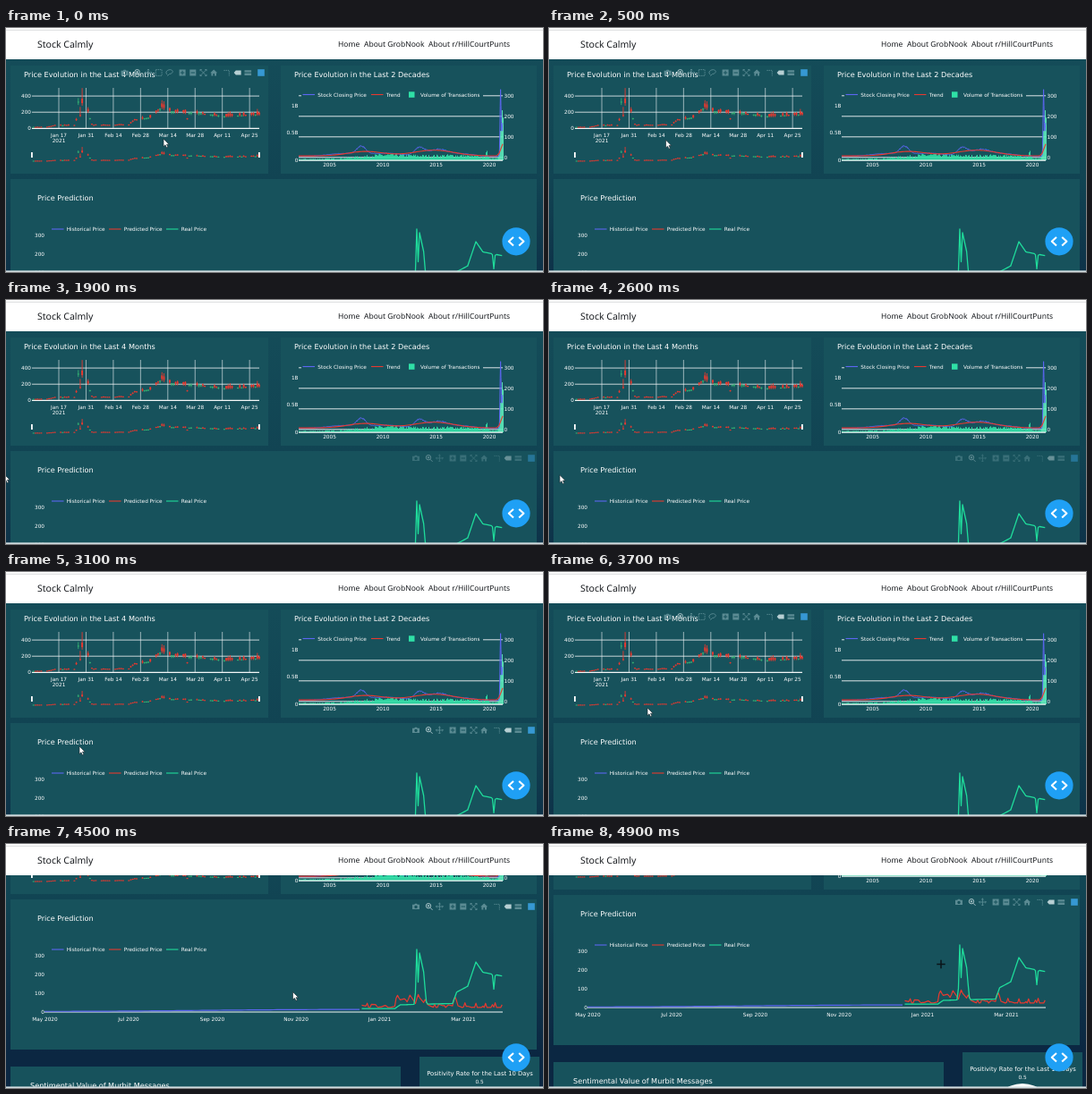
An HTML page that plays this animation: 600x273 px, repeating every 5000 ms.

```html
<!DOCTYPE html>
<html lang="en">
<head>
<meta charset="utf-8">
<title>Stock dashboard</title>
<style>
html, body { margin: 0; width: 100%; height: 100%; overflow: hidden; background: #124553; }
svg { display: block; width: 100vw; height: 100vh; }
text { font-family: "DejaVu Sans", Verdana, sans-serif; fill: #fff; text-rendering: geometricPrecision; }
.nav { font-family: "Noto Sans", "Open Sans", sans-serif; fill: #1a1d21; }
</style>
</head>
<body>
<svg id="stage" viewBox="0 0 600 273" preserveAspectRatio="none">
  <defs>
    <linearGradient id="sky" x1="0" y1="0" x2="0" y2="1">
      <stop offset="0" stop-color="#154e5a"/>
      <stop offset=".42" stop-color="#114453"/>
      <stop offset=".85" stop-color="#0b2742"/>
    </linearGradient>
  </defs>
  <g id="page"></g>
  <g id="chrome"></g>
  <path id="arrow" d="M0 0V8.6L2 6.8L3.4 9.8L4.9 9.1L3.5 6.2H6.2Z" fill="#fff" stroke="#15242b" stroke-width=".6"/>
  <path id="cross" d="M-4.7 0H4.7M0 -4.7V4.7" stroke="#0a1418" stroke-width="1.5"/>
</svg>
<script>
const LOOP = 5000, STEP = 100;
const PURPLE = "#5c66f2", RED = "#e8392f", GREEN = "#1fdc9b", MINT = "#2fe0a6";
const PANEL = "#17525c", WHITE = "#f4f7f8";
const $ = id => document.getElementById(id);
const page = $("page"), chrome = $("chrome");

function el(parent, tag, attrs, content) {
  const node = document.createElementNS("http://www.w3.org/2000/svg", tag);
  for (const k in attrs) node.setAttribute(k, attrs[k]);
  if (content) node.textContent = content;
  parent.appendChild(node);
  return node;
}
const box = (p, x, y, width, height, fill) => el(p, "rect", { x, y, width, height, fill });
const path = (p, d, stroke, width) =>
  el(p, "path", { d, stroke, "stroke-width": width, fill: "none", "stroke-linejoin": "round" });
const label = (p, x, y, str, size = 5.75, anchor = "start", more) =>
  el(p, "text", { x, y, "font-size": size, "text-anchor": anchor, ...more }, str);

// Draws y = f(x) through the given x values
const plot = (xs, f, color, width) =>
  path(page, "M" + xs.map(x => x.toFixed(2) + " " + f(x).toFixed(2)).join("L"), color, width);

function range(from, to, step = 1) {
  const out = [];
  for (let v = from; v <= to; v += step) out.push(v);
  return out;
}

// Linear interpolation in rows of [key, value, ...]
function at(rows, t, col = 1) {
  const i = rows.findIndex(r => t <= r[0]);
  if (i < 0) return rows[rows.length - 1][col];
  if (i == 0) return rows[0][col];
  const a = rows[i - 1], b = rows[i];
  return a[col] + (b[col] - a[col]) * (t - a[0]) / (b[0] - a[0]);
}

const bump = (x, center, width, height) => height * Math.exp(-(((x - center) / width) ** 2));

let seed = 7;
const rand = () => (seed = (seed * 16807) % 2147483647) / 2147483647;

// Closing price by day, 0 = January 1: a slow drift plus the January squeeze
const drift = [[10, 18], [14, 38], [52, 45], [55, 105], [63, 136], [69, 264], [74, 210], [88, 190], [101, 150], [119, 174]];
const close = d => at(drift, d) + bump(d, 26, .8, 290) + bump(d, 28, .8, 270) +
  bump(d, 31, 1.2, 170) - bump(d, 82, .6, 78);
const tradingDays = (from, to) => range(from, to).filter(d => ![1, 2].includes((d + 70) % 7));

function legendLine(x, y, color, str) {
  path(page, `M${x} ${y}h13.5`, color, 1.1);
  label(page, x + 16.8, y + 2.1, str);
}

function buildCandles() {
  const y0 = 112.3, k = .0905;
  label(page, 20, 55, "Price Evolution in the Last 4 Months", 8.2);
  for (const v of [400, 200, 0]) {
    path(page, `M29 ${y0 - v * k}H283`, WHITE, v ? .8 : 1.2);
    label(page, 28, y0 - v * k + 2.1, String(v), 5.75, "end");
  }
  ["Jan 17", "Jan 31", "Feb 14", "Feb 28", "Mar 14", "Mar 28", "Apr 11", "Apr 25"].forEach((s, i) => {
    const x = 59 + i * 30.45;
    path(page, `M${x} 67V113`, WHITE, .6);
    label(page, x, 121.7, s, 5.75, "middle");
  });
  label(page, 59, 128.2, "2021", 5.75, "middle");

  for (const d of tradingDays(3, 119)) {
    const end = close(d), open = end * (.93 + rand() * .27);
    const x = 59 + (d - 16) * 2.175;
    const top = Math.max(open, end), gap = Math.abs(end - open);
    const high = top + gap * rand() + bump(d, 27.5, 1.5, 110), low = Math.min(open, end) * .9;
    const color = end > open ? "#35b173" : RED;
    for (const [base, scale] of [[y0, k], [149, .032]]) {
      path(page, `M${x} ${base - high * scale}V${base - low * scale}`, color, .9);
      box(page, x - .95, base - top * scale, 1.9, Math.max(1.1, gap * scale), color);
    }
  }
  for (const x of [28, 282]) box(page, x, 139, 1.8, 6, "#fff");
}

function buildHistory() {
  const y = p => 145 - p * .23;
  label(page, 322, 55, "Price Evolution in the Last 2 Decades", 8.15);
  for (const v of [300, 200, 100, 0]) {
    path(page, `M327 ${y(v) - .2}H555`, WHITE, .9);
    label(page, 556.5, y(v) + 2, String(v));
  }
  box(page, 330, 68, 203, 12, PANEL);
  ["1B", "0.5B", "0"].forEach((s, i) => label(page, 326.5, 88.8 + i * 30.6, s, 5.75, "end"));
  for (let year = 2005; year <= 2020; year += 5)
    label(page, 361.5 + (year - 2005) * 11.9, 155.2, String(year), 5.75, "middle");

  for (const x of range(327, 555)) {
    const size = 1.5 + bump(x, 430, 45, 5) + bump(x, 505, 35, 4) + bump(x, 536, 1.5, 9) + bump(x, 554, 3, 50);
    const h = size * (.55 + rand() * .65);
    box(page, x, 148 - h, .9, h, x > 549 ? "#5debbb" : MINT);
  }
  path(page, "M327 148.2H555", WHITE, 1.2);

  const price = x => 6 + bump(x, 378, 25, 14) + bump(x, 397, 7, 38) + bump(x, 425, 25, 15) +
    bump(x, 462, 8, 38) + bump(x, 483, 15, 34) + bump(x, 510, 18, 12) + bump(x, 552.6, .8, 300) + bump(x, 555, 1.5, 165);
  const trend = x => 8 + bump(x, 402, 28, 22) + bump(x, 478, 32, 28) + bump(x, 556, 4, 62);
  plot(range(327, 555, .4), x => y(price(x) * (.94 + rand() * .12)), PURPLE, 1);
  plot(range(327, 555, 2), x => y(trend(x)), RED, 1.1);

  legendLine(331.5, 74.5, PURPLE, "Stock Closing Price");
  legendLine(408, 74.5, RED, "Trend");
  box(page, 450, 71.3, 6.5, 6.5, MINT);
  label(page, 463, 76.6, "Volume of Transactions");
}

function buildPrediction() {
  const y = p => 295 - p * .212, day = x => (x - 419) / 1.537;
  label(page, 35, 193, "Price Prediction", 8.1);
  legendLine(51, 225, PURPLE, "Historical Price");
  legendLine(115, 225, RED, "Predicted Price");
  legendLine(179, 225, GREEN, "Real Price");
  for (const v of [300, 200, 100, 0]) label(page, 43, y(v) + 2.1, String(v), 5.75, "end");
  ["May 2020", "Jul 2020", "Sep 2020", "Nov 2020", "Jan 2021", "Mar 2021"].forEach((s, i) =>
    label(page, 43.5 + i * 93.5, 304.7, s, 5.75, "middle"));
  path(page, "M43 295H555", WHITE, 1.2);

  const guess = d => 24 + 26 * rand() ** 3 + bump(d, 12, 1.2, 50) + bump(d, 17, 4, 30) +
    bump(d, 22, 2, 55) + bump(d, 27, 1.5, 50) + bump(d, 31, 4, 26) + bump(d, 54, 1.5, 52);
  const days = tradingDays(-14, 88).map(d => 419 + d * 1.537);
  plot(range(43, 395, 4), x => y(8.5 - 5 * Math.cos((x - 43) / 112)), PURPLE, 1.2);
  plot(days, x => y(guess(day(x))), RED, 1.2);
  plot(days, x => y(close(day(x))), GREEN, 1.3);
}

const panels = [[5, 42, 288, 121], [307, 42, 286, 121], [5, 169, 588, 168], [5, 356, 436, 60], [462, 345, 134, 60]];

function buildPage() {
  box(page, 0, 0, 600, 400, "url(#sky)");
  for (const p of panels) box(page, ...p, PANEL);
  buildCandles();
  buildHistory();
  buildPrediction();
  label(page, 27, 380, "Sentimental Value of Murbit Messages", 8.15);
  label(page, 529.5, 366, "Positivity Rate for the Last 10 Days", 6.75, "middle");
  label(page, 529, 375.2, "0.5", 5.75, "middle");
  el(page, "circle", { cx: 529, cy: 414, r: 34, fill: "#fff" });
}

// Toolbar glyphs, each centred on 0,0: [path, solid, dash]
const glyphs = {
  camera: ["M-4 -2.2H-1.8L-1 -3.2H1L1.8 -2.2H4V3H-4ZM0 -1.3A1.7 1.7 0 1 0 .01 -1.3Z", true],
  zoom: ["M1.3 1.3L3.8 3.8M2 -.8A2.7 2.7 0 1 1 -3.4 -.8A2.7 2.7 0 1 1 2 -.8M-2 -.8H.6M-.7 -2.1V.5"],
  pan: ["M-4 0H4M0 -4V4M-2.8 -1.2L-4 0L-2.8 1.2M2.8 -1.2L4 0L2.8 1.2M-1.2 -2.8L0 -4L1.2 -2.8M-1.2 2.8L0 4L1.2 2.8"],
  select: ["M-3.4 -3.4H3.4V3.4H-3.4Z", false, "1.5 .8"],
  lasso: ["M-2 2.4C-6 -1 -1 -4 2 -3.2S4.4 1 0 1.6L-2 3.6"],
  plus: ["M-3.5 -3.5H3.5V3.5H-3.5ZM-.5 -2.2V-.5H-2.2V.5H-.5V2.2H.5V.5H2.2V-.5H.5V-2.2Z", true],
  minus: ["M-3.5 -3.5H3.5V3.5H-3.5ZM-2.2 -.5V.5H2.2V-.5Z", true],
  fit: ["M-3.5 -3.5L3.5 3.5M3.5 -3.5L-3.5 3.5M-3.5 -1.8V-3.5H-1.8M1.8 -3.5H3.5V-1.8M3.5 1.8V3.5H1.8M-1.8 3.5H-3.5V1.8"],
  home: ["M-4 .2L0 -3.6L4 .2H2.8V3.4H.8V1H-.8V3.4H-2.8V.2Z", true],
  spike: ["M-3.5 -2.6H2.4V3.6", false, "1.4 .8"],
  tag: ["M-4 0L-1.8 -2.4H4V2.4H-1.8Z", true],
  pair: ["M-3.8 -2.8H3.8V-.5H-3.8ZM-3.8 .6H3.8V2.9H-3.8Z", true]
};

// Lays the groups out from the right edge to the left
function toolbar(right, y, dragTools) {
  const g = el(page, "g", {});
  const groups = ["camera", dragTools, "plus minus fit home", "spike tag pair"];
  box(g, right - 3.8, y - 3.8, 7.6, 7.6, "#3aa0e0");
  let x = right;
  for (const group of groups.reverse()) {
    x -= 3;
    for (const name of group.split(" ").reverse()) {
      x -= 11.7;
      const [d, solid, dash] = glyphs[name];
      const color = name == "zoom" || name == "tag" ? "#c9dde0" : "#63929a";
      el(g, "path", {
        d, transform: `translate(${x} ${y})`, fill: solid ? color : "none", "fill-rule": "evenodd",
        stroke: solid ? "none" : color, "stroke-width": .9, "stroke-dasharray": dash || "none"
      });
    }
  }
  return g;
}

function buildChrome() {
  box(chrome, 0, 0, 600, 35, "#fff");
  box(chrome, 0, 1.8, 600, .9, "#d4d6d8");
  const nav = (x, str, size) => label(chrome, x, 18 + size * .36, str, size, "start", { class: "nav" });
  nav(35, "Stock Calmly", 10.5);
  nav(371, "Home", 8.5);
  nav(400, "About GrobNook", 8.5);
  nav(472, "About r/HillCourtPunts", 8.5);
  box(chrome, 0, 271.4, 600, 1.6, "#d3dee1");
  el(chrome, "circle", { cx: 570, cy: 238.8, r: 15.6, fill: "#1fa0f5" });
  path(chrome, "M567 234L561.8 238.8L567 243.6M573.2 234L578.4 238.8L573.2 243.6", "#fff", 2.1);
}

buildPage();
const allDrag = "zoom pan select lasso";
const bars = [toolbar(285, 50, allDrag), toolbar(587, 50, allDrag), toolbar(587, 177, "zoom pan")];
buildChrome();

const pointer = [[0, 176, 124], [1100, 76, 127], [1900, -2, 195], [2500, -2, 196], [3100, 82, 195],
  [3700, 110, 152], [4000, 314, 150], [4300, 324.5, 166.5], [4500, 320.5, 165.5], [4900, 438, 134.5]];
const scroll = [[4300, 0], [4500, 107], [4600, 112]];

function hovers([x, y, w, h], t) {
  const px = at(pointer, t) - x, py = at(pointer, t, 2) + at(scroll, t) - y;
  return px > 0 && px < w && py > 0 && py < h;
}

function draw(ms) {
  const t = Math.floor(ms % LOOP / STEP) * STEP;
  page.setAttribute("transform", `translate(0 ${-at(scroll, t)})`);
  // A toolbar fades in and out over two steps as the pointer enters or leaves its panel
  bars.forEach((bar, i) =>
    bar.setAttribute("opacity", .45 * (hovers(panels[i], t) + hovers(panels[i], t - STEP))));
  const place = `translate(${at(pointer, t)} ${at(pointer, t, 2)})`;
  const aiming = t > 4500;
  for (const [id, on] of [["arrow", !aiming], ["cross", aiming]]) {
    $(id).setAttribute("transform", place);
    $(id).setAttribute("visibility", on ? "visible" : "hidden");
  }
}

let start;
function tick(now) {
  start ??= now;
  draw(now - start);
  requestAnimationFrame(tick);
}
draw(0);
requestAnimationFrame(tick);
</script>
</body>
</html>
```
